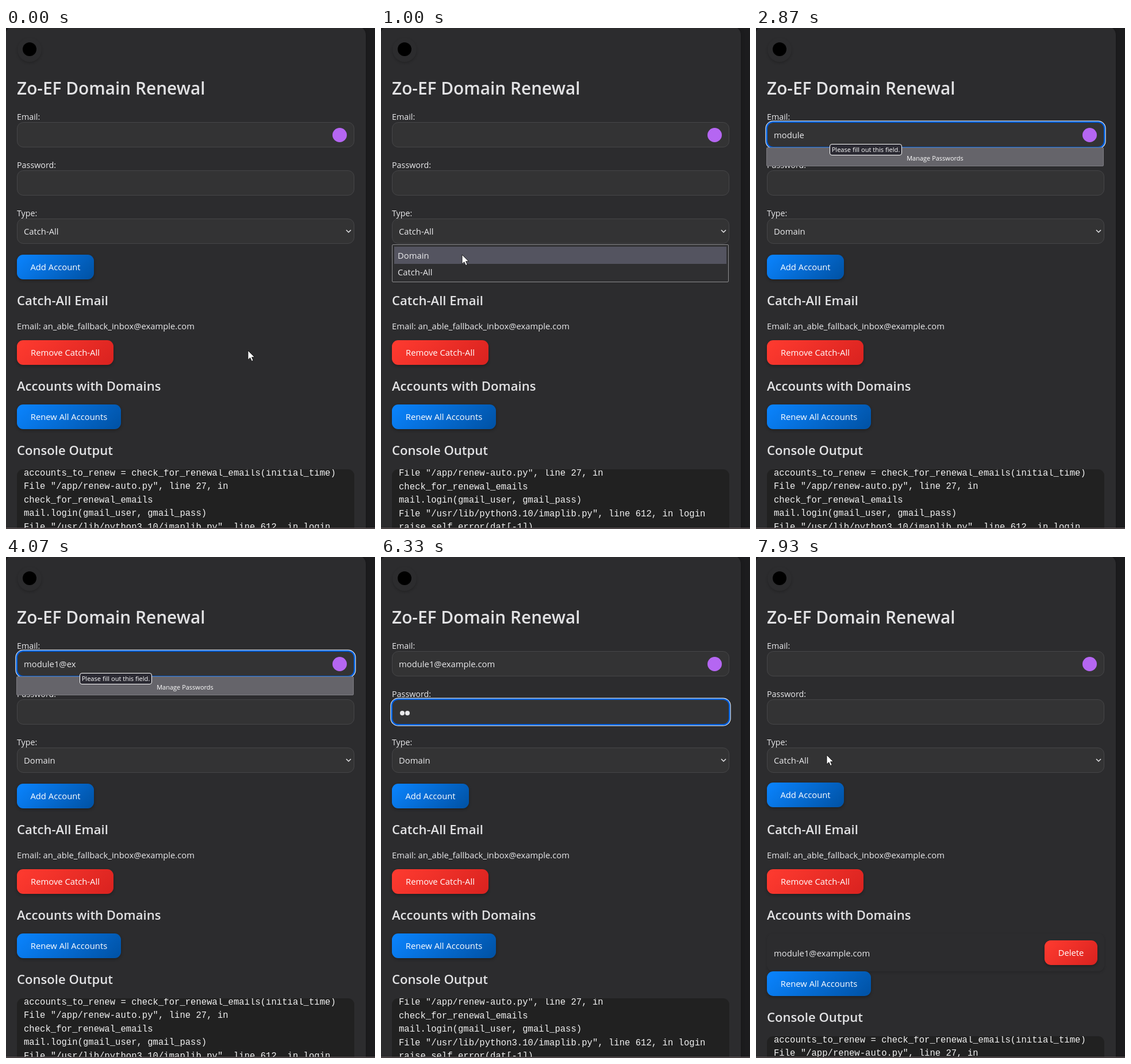
Recreate the animation shown at these times as an HTML page. Size 642 by 873 pixels, loop 8000 ms.

```html
<!DOCTYPE html>
<html lang="en">
<head>
<meta charset="utf-8">
<title>Domain Renewal</title>
<style>
html, body { margin: 0; width: 100%; height: 100%; overflow: hidden; background: #1c1c1e; }
#stage { position: relative; width: 642px; height: 873px; overflow: hidden; color: #eaeaec;
  font: 14.8px/30px "Open Sans", "Noto Sans", sans-serif; }
#stage * { position: absolute; box-sizing: border-box; white-space: pre; }
.card { left: -1px; top: -3px; width: 627px; height: 890px; border-radius: 15px; background: #2c2c2e;
  box-shadow: 0 0 6px rgba(0,0,0,.25); }
.toggle { left: 20px; top: 17px; width: 42px; height: 42px; border-radius: 50%; background: #2c2c2e;
  box-shadow: 0 2px 4px rgba(0,0,0,.2); }
.moon { left: 29px; top: 25px; width: 24px; height: 24px; border-radius: 50%; background: #000; }
h1, h2 { margin: 0; left: 19px; font-weight: 600; color: #e2e2e4; }
h1 { top: 90px; font-size: 29.8px; }
h2 { font-size: 22.1px; }
label { left: 19px; font-size: 14.3px; }
.field { left: 19px; width: 587px; height: 44px; border: 1px solid #464648; border-radius: 11px;
  background: #333334; line-height: 43px; padding-left: 11px; }
.focus { border-color: #0060df; box-shadow: 0 0 0 1.6px #0060df, 0 0 0 2.6px #fff; }
.badge { left: 568px; top: 174px; width: 25px; height: 25px; border-radius: 50%; background: #b566f2; }
.btn { height: 43px; border-radius: 11px; line-height: 43px; text-align: center; color: #fff;
  box-shadow: 0 2px 5px rgba(0,0,0,.3); }
.blue { left: 19px; background: linear-gradient(135deg, #0a84ff, #0051a3); }
.blue.hover { background: linear-gradient(135deg, #0051a3, #003f80); }
.red { background: linear-gradient(135deg, #ff3b30, #d9221f); }
.row { left: 19px; top: 656px; width: 587px; height: 66px; border-radius: 11px;
  box-shadow: 0 2px 4px rgba(0,0,0,.16); }
#low { left: 0; top: 0; width: 642px; height: 873px; }
.console { left: 19px; top: 769px; width: 587px; height: 200px; border-radius: 11px; overflow: hidden;
  background: #212121; }
#log { left: 12px; top: -4px; color: #f2f2f2;
  font: 15.6px/23.4px "Courier New", "Liberation Mono", monospace; }
.caret { width: 1px; height: 19px; background: #fff; }
.dot { top: 19px; width: 8px; height: 8px; border-radius: 50%; background: #e8e8ea; }
#menu { left: 19px; top: 377px; width: 586px; height: 66px; border: 1px solid #8c8c8e; border-radius: 2px;
  background: #2f2f31; }
.pick { left: 3px; width: 578px; height: 30px; padding-left: 6px; }
.pick.on { background: #545460; }
#popup { left: 18px; top: 208px; width: 587px; height: 33px; border: 1px solid #7d7c82; border-radius: 2px;
  background: #65646a; color: #fff; font-size: 11px; line-height: 35px; text-align: center; }
#tip { left: 128px; top: 202px; width: 126px; height: 20px; border: 1px solid #fff; border-radius: 4px;
  background: #2b2a33; color: #fff; font-size: 11.1px; line-height: 18px; text-align: center; }
.edge { left: 0; top: 871px; width: 642px; height: 1px; background: #77696b; }
.under { left: 0; top: 872px; width: 642px; height: 1px; background: #252526; }
#pointer { left: 0; top: 0; width: 1px; height: 1px; overflow: visible; }
#stage [hidden] { display: none; }
</style>
</head>
<body>
<div id="stage">
  <div class="card"></div>
  <div class="toggle"></div><div class="moon"></div>
  <h1>Zo-EF Domain Renewal</h1>
  <label style="top:140px">Email:</label>
  <div class="field" id="email" style="top:164px"></div>
  <div class="badge"></div>
  <label style="top:224px">Password:</label>
  <div class="field" id="pass" style="top:248px"></div>
  <label style="top:308px">Type:</label>
  <div class="field" id="type" style="top:332px"></div>
  <svg style="left:591px;top:350px" width="10" height="8"><path d="M1 2l4 4 4-4" fill="none" stroke="#e8e8ea" stroke-width="1.5"/></svg>
  <div class="btn blue" id="add" style="top:395px;width:134px">Add Account</div>
  <h2 style="top:459px">Catch-All Email</h2>
  <div style="left:19px;top:504px">Email: an_able_fallback_inbox@example.com</div>
  <div class="btn red" style="left:19px;top:544px;width:168px">Remove Catch-All</div>
  <h2 style="top:608px">Accounts with Domains</h2>
  <div class="row" id="row">
    <span style="left:12px;top:19px">module1@example.com</span>
    <span class="btn red" style="left:483px;top:12px;width:92px">Delete</span>
  </div>
  <div id="low">
    <div class="btn blue" style="top:656px;width:181px">Renew All Accounts</div>
    <h2 style="top:720px">Console Output</h2>
    <div class="console"><div id="log">accounts_to_renew = check_for_renewal_emails(initial_time)
File "/app/renew-auto.py", line 27, in
check_for_renewal_emails
mail.login(gmail_user, gmail_pass)
File "/usr/lib/python3.10/imaplib.py", line 612, in login
raise self.error(dat[-1])</div></div>
  </div>
  <div id="menu">
    <div class="pick" id="pick0" style="top:3px">Domain</div>
    <div class="pick" id="pick1" style="top:32px">Catch-All</div>
  </div>
  <div id="popup">Manage Passwords</div>
  <div id="tip">Please fill out this field.</div>
  <div class="edge"></div><div class="under"></div>
  <svg id="pointer">
    <path id="arrow" d="M0 0V16.2L3.8 12.7 6.5 18.6 9.2 17.4 6.6 11.7H11.6Z" fill="#fff" stroke="#111" stroke-width=".9"/>
    <path id="beam" d="M-3-7.5H-1L0-6.5 1-7.5H3M0-6.5V6.5M-3 7.5H-1L0 6.5 1 7.5H3" fill="none" stroke="#d8d8da" stroke-width="1.1"/>
    <path id="hand" d="M-1.6 1.2Q0-1 1.6 1.2V8Q3.5 6.6 4.6 8.4 6.6 7.4 7.4 9.2 9.8 8.6 10 11V15.5L8 21.5H-.2L-5.6 13.4Q-5.4 10.6-3.4 11.8L-1.6 13.4Z" fill="#fff" stroke="#111" stroke-width="1"/>
  </svg>
</div>
<script>
const LOOP = 8000;
const ADDRESS = "module1@example.com";
const $ = id => document.getElementById(id);

// One time per typed character.
const KEYS = [2270, 2400, 2470, 2600, 2670, 2730, 3130, 3400, 3800, 4000, 4130,
  4470, 4670, 4730, 4800, 5000, 5070, 5130, 5180];
const PASS_KEYS = [6200, 6330, 6400, 6530, 6600, 6670];

// Rows of time and value(s), joined by straight lines.
const PATH = [[70, 421, 562], [630, 150, 345], [730, 150, 345], [930, 141, 395], [1270, 141, 395],
  [1600, 130, 183], [6800, 130, 183], [7130, 118, 408], [7740, 118, 408], [7920, 123, 345]];
const SCROLL = [[870, 0], [990, 23.4], [1130, 23.4], [1131, 0], [6200, 0], [6330, 23.4], [6470, 23.4],
  [6471, 0], [7800, 0], [7870, 23.4], [7929, 23.4], [7930, 0]];
const LIFT = [[7170, 0], [7370, -2], [7930, -2], [8000, -1.4]];

const during = (t, a, b) => t >= a && t < b;
const count = (keys, t) => keys.filter(k => t >= k).length;
const show = (el, on) => el.toggleAttribute("hidden", !on);

function along(keys, t, i = 1) {
  const n = keys.findIndex(k => k[0] > t);
  if (n < 0) return keys[keys.length - 1][i];
  if (n === 0) return keys[0][i];
  const [a, b] = [keys[n - 1], keys[n]];
  return a[i] + (b[i] - a[i]) * (t - a[0]) / (b[0] - a[0]);
}

function add(parent, cls, left, top) {
  const el = document.createElement("i");
  el.className = cls;
  el.style.left = left + "px";
  if (top !== undefined) el.style.top = top + "px";
  parent.append(el);
  return el;
}

const email = document.createElement("span");
$("email").append(email);
const emailCaret = add($("email"), "caret", 13, 12);
const passCaret = add($("pass"), "caret", 13, 12);
const dots = PASS_KEYS.map((_, i) => add($("pass"), "dot", 12.5 + i * 9.6));

function drawForm(t) {
  const added = t >= 7670;

  email.textContent = added ? "" : ADDRESS.slice(0, count(KEYS, t));
  emailCaret.style.left = 12 + email.offsetWidth + "px";
  show(emailCaret, during(t, 1600, 2270) || during(t, 5180, 5330));
  show(passCaret, during(t, 5870, 6200));
  const typed = added ? 0 : count(PASS_KEYS, t);
  dots.forEach((d, i) => show(d, i < typed));
  $("email").classList.toggle("focus", during(t, 1600, 5400));
  $("pass").classList.toggle("focus", during(t, 5870, 7670));
  $("type").textContent = during(t, 1270, 7670) ? "Domain" : "Catch-All";

  show($("menu"), during(t, 700, 1270));
  $("pick0").classList.toggle("on", t >= 860);
  $("pick1").classList.toggle("on", t < 860);
  show($("popup"), during(t, 2270, 5400));
  show($("tip"), during(t, 2600, 5870));

  show($("row"), added);
  $("low").style.top = (added ? 66 : 0) + "px";
  $("log").style.transform = `translateY(${-along(SCROLL, t)}px)`;
}

function drawPointer(t) {
  const x = along(PATH, t, 1), y = along(PATH, t, 2);
  const overInput = during(y, 164, 208) || during(y, 248, 292);
  const overAdd = !during(t, 700, 1270) && x < 152 && during(y, 393, 437);
  show($("beam"), overInput);
  show($("hand"), overAdd);
  show($("arrow"), !overInput && !overAdd);
  $("pointer").style.transform = `translate(${x}px,${y}px)`;
  $("pointer").style.visibility = during(t, 2270, 6800) ? "hidden" : "visible";

  $("add").classList.toggle("hover", overAdd);
  $("add").style.transform = `translateY(${along(LIFT, t)}px)`;
}

function tick() {
  const t = performance.now() % LOOP;
  drawForm(t);
  drawPointer(t);
  requestAnimationFrame(tick);
}
tick();
</script>
</body>
</html>
```
